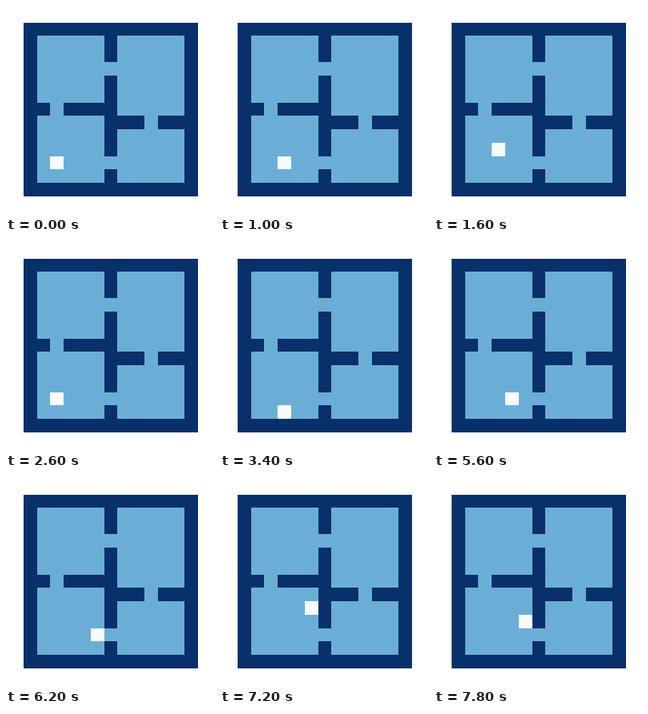
Recreate the animation shown at these times as an HTML page with a canvas. Size 260 px wide and 260 px high, loop 8 s.

```html
<!DOCTYPE html>
<html lang="en">
<head>
<meta charset="utf-8">
<title>Four rooms</title>
<style>
  html, body { margin: 0; width: 100%; height: 100%; overflow: hidden; background: #fff; }
  canvas { display: block; width: 260px; height: 260px; }
</style>
</head>
<body>
<canvas id="stage" width="260" height="260"></canvas>
<script>
const STEP = 200, SIZE = 13, CELL = 16.76;
const WALL = '#08306b', FLOOR = '#6aaed6', AGENT = '#f7fbff';

// Cell edges snapped to whole pixels
const edgeX = col => Math.round(21.95 + CELL * col);
const edgeY = row => Math.round(20 + CELL * row);

// Inner walls: one column down the middle, one row on each side of it
const middle = 6;
const wallRow = col => col < middle ? 6 : 7;
const doors = ['6,3', '2,6', '9,7', '6,10'];
const isFloor = (col, row) =>
  doors.includes(`${col},${row}`) || (col !== middle && row !== wallRow(col));

// One move per step; a dot means the agent stays put
const moves = '.D..RURULDD.LULRDR.RURDL..LURDURU...UDDU';

function agentAt(step) {
  const walked = moves.slice(0, step + 1);
  const count = move => walked.split(move).length - 1;
  return [2 + count('R') - count('L'), 10 + count('D') - count('U')];
}

const ctx = document.getElementById('stage').getContext('2d');

function fillCell(color, col, row) {
  const x = edgeX(col), y = edgeY(row);
  ctx.fillStyle = color;
  ctx.fillRect(x, y, edgeX(col + 1) - x, edgeY(row + 1) - y);
}

function drawRooms() {
  ctx.fillStyle = WALL;
  ctx.fillRect(22, 21, 218, 217);
  for (let row = 1; row < SIZE - 1; row++) {
    for (let col = 1; col < SIZE - 1; col++) {
      if (isFloor(col, row)) fillCell(FLOOR, col, row);
    }
  }
}

const start = performance.now();

function draw() {
  const step = Math.floor((performance.now() - start) / STEP) % moves.length;
  drawRooms();
  fillCell(AGENT, ...agentAt(step));
  requestAnimationFrame(draw);
}
draw();
</script>
</body>
</html>
```
